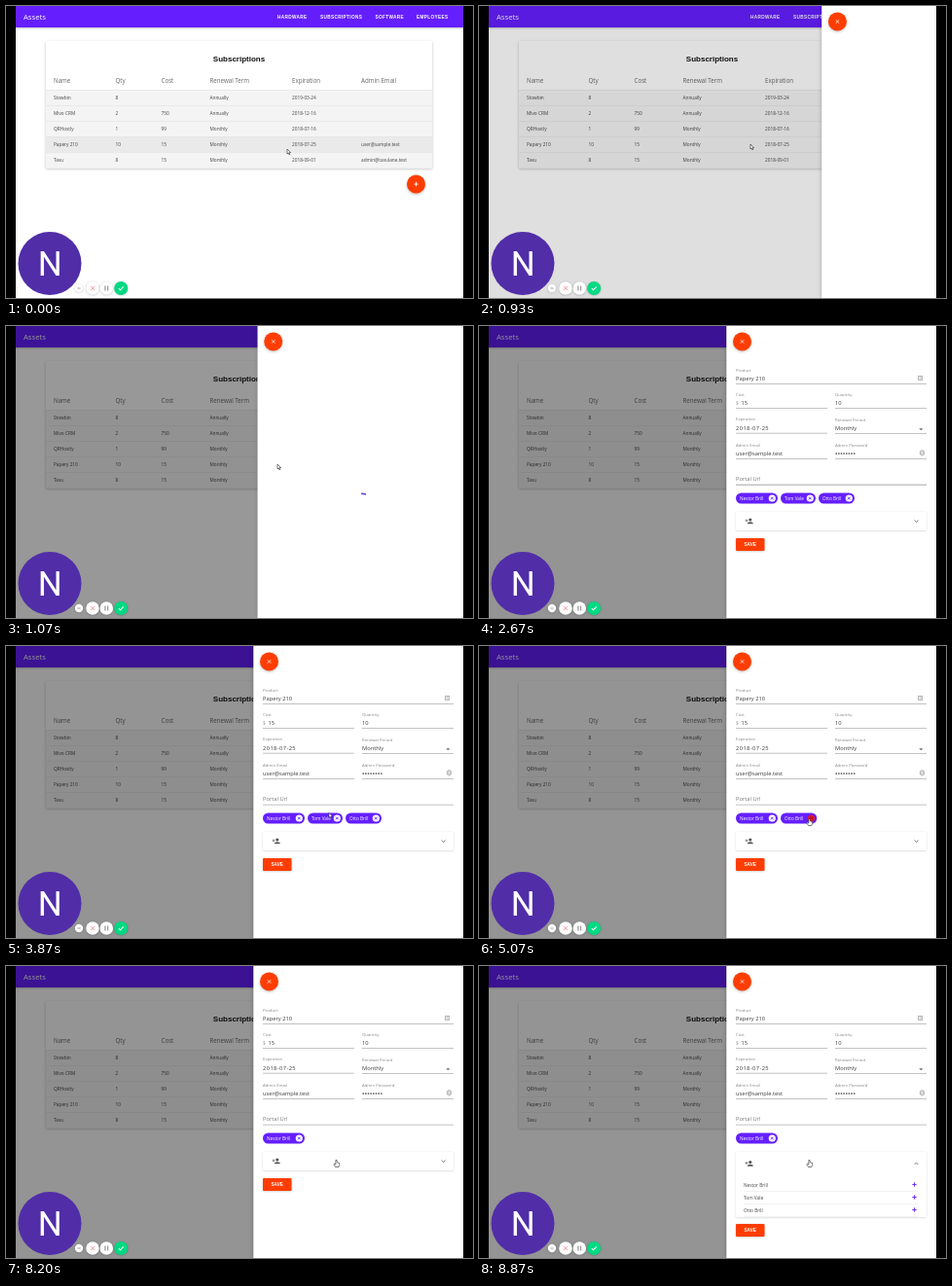
Animation of 480x300 px, one loop 9.19 s. Source, as an HTML page with a canvas:

```html
<!DOCTYPE html>
<html lang="en">
<head>
<meta charset="utf-8">
<title>Assets</title>
<style>
html, body { margin: 0; width: 100%; height: 100%; overflow: hidden; background: #000; }
canvas { display: block; width: 480px; height: 300px; }
</style>
</head>
<body>
<canvas id="stage"></canvas>
<script>
const canvas = document.getElementById('stage');
const ratio = window.devicePixelRatio || 1;
canvas.width = 480 * ratio;
canvas.height = 300 * ratio;
const c = canvas.getContext('2d');

const LOOP = 9190, OPEN = 882, LOADED = 1730, EXPAND = 8640;
const FIRST_REMOVED = 4670, SECOND_REMOVED = 7530;
const PAGE_WIDTH = 460;
const PURPLE = '#651fff', ORANGE = '#ff3d00';
const SANS = '"Open Sans", sans-serif', ARIAL = '"Liberation Sans", sans-serif';

const columns = [49, 112.5, 159.5, 209.5, 294, 365];
const headings = ['Name', 'Qty', 'Cost', 'Renewal Term', 'Expiration', 'Admin Email'];
const rows = [
  ['Stowbin', '8', '', 'Annually', '2019-03-24', ''],
  ['Mivo CRM', '2', '750', 'Annually', '2018-12-16', ''],
  ['QRHostly', '1', '99', 'Monthly', '2018-07-16', ''],
  ['Papery 210', '10', '15', 'Monthly', '2018-07-25', 'user@sample.test'],
  ['Tavu', '8', '15', 'Monthly', '2018-09-01', 'admin@tavulane.test']
];
const people = ['Nestor Brill', 'Tom Vale', 'Otto Brill'];

// time, x, y of the pointer tip
const pointerPath = [
  [0, 289, 147], [870, 289, 147], [930, 279, 142], [LOADED, 279, 142],
  [2670, 318, 153], [3300, 318, 160], [4250, 339.5, 177.5], [6470, 339.5, 177.5],
  [6730, 335.8, 177], [7270, 335.8, 177], [7430, 340, 177.5], [7600, 340, 177.5],
  [7870, 339.5, 199.5], [LOOP, 339.5, 199.5]
];

const clamp = v => Math.max(0, Math.min(1, v));
const mix = (a, b, p) => a + (b - a) * p;
const smooth = p => p * p * (3 - 2 * p);

// cubic-bezier(.25, .8, .25, 1)
function swift(x) {
  let lo = 0, hi = 1, s = .5;
  for (let i = 0; i < 20; i++) {
    s = (lo + hi) / 2;
    if (.75 * s * (1 - s) + s ** 3 < x) lo = s; else hi = s;
  }
  return 2.4 * s * (1 - s) ** 2 + 3 * s * s * (1 - s) + s ** 3;
}

function text(str, x, y, size, color, { font = SANS, weight = 400, align = 'left', spacing = 0 } = {}) {
  c.font = `${weight} ${size}px ${font}`;
  c.textAlign = align;
  c.letterSpacing = spacing + 'px';
  c.fillStyle = color;
  c.fillText(str, x, y);
}

function rect(x, y, w, h, color) {
  c.fillStyle = color;
  c.fillRect(x, y, w, h);
}

function shadowed(blur, dy, draw, alpha = .25) {
  c.save();
  c.shadowColor = `rgba(0,0,0,${alpha})`;
  c.shadowBlur = blur * ratio;
  c.shadowOffsetY = dy * ratio;
  draw();
  c.restore();
}

function rounded(x, y, w, h, r, color) {
  c.fillStyle = color;
  c.beginPath();
  c.roundRect(x, y, w, h, r);
  c.fill();
}

function circle(x, y, r, color) {
  c.fillStyle = color;
  c.beginPath();
  c.arc(x, y, r, 0, 7);
  c.fill();
}

function line(color, width, ...points) {
  c.strokeStyle = color;
  c.lineWidth = width;
  c.beginPath();
  points.forEach(([x, y]) => c.lineTo(x, y));
  c.stroke();
}

function cross(x, y, r, color, width) {
  line(color, width, [x - r, y - r], [x + r, y + r]);
  line(color, width, [x - r, y + r], [x + r, y - r]);
}

function plus(x, y, r, color, width) {
  line(color, width, [x - r, y], [x + r, y]);
  line(color, width, [x, y - r], [x, y + r]);
}

function drawPage(t) {
  rect(10, 0, PAGE_WIDTH, 300, '#fff');
  shadowed(2, .5, () => rect(10, 0, PAGE_WIDTH, 22, PURPLE));
  text('Assets', 18, 14, 7.7, '#fff', { weight: 500 });
  [['HARDWARE', 279], ['SUBSCRIPTIONS', 323], ['SOFTWARE', 379.5], ['EMPLOYEES', 422]].forEach(([s, x]) =>
    text(s, x, 12.6, 4.7, '#fff', { font: ARIAL, weight: 700, spacing: .36 }));

  shadowed(3, 1, () => rounded(41, 36, 397, 130.5, 1, '#fff'));
  text('Subscriptions', 239.5, 56.5, 8, '#111', { font: ARIAL, weight: 700, align: 'center' });
  headings.forEach((s, i) => text(s, columns[i], 79, 6.2, '#666'));
  rows.forEach((row, r) => {
    const y = 86 + r * 16.1;
    rect(41, y, 397, 16.1, r === 3 && t < 870 ? '#eaeaea' : '#f4f4f4');
    rect(41, y, 397, .5, '#dcdcdc');
    row.forEach((s, i) => text(s, columns[i], y + 9.7, 4.75, '#444'));
  });

  shadowed(3, 1.2, () => circle(421.5, 183, 9.5, ORANGE));
  plus(421.5, 183, 2.3, '#fff', .9);
}

function field(label, value, x, y, w, spacing = 0) {
  text(label, x, y - 13, 4.3, '#888');
  text(value, x, y - 3.6, 5.75, '#3a3a3a', { spacing });
  rect(x, y - .4, w, .6, '#999');
}

function chip(name, x, w, hot) {
  rounded(x, 171.5, w, 11, 5.5, PURPLE);
  text(name, x + 4, 178.8, 4.7, '#fff', { weight: 500 });
  const cx = x + w - 5.7;
  circle(cx, 177, 3.6, hot ? '#e0182d' : '#fff');
  cross(cx, 177, 1.4, hot ? '#a00c20' : PURPLE, .9);
}

function drawPeoplePanel(t) {
  const p = smooth(clamp((t - EXPAND) / 220));
  const height = mix(19, 67, p), iconY = mix(200.5, 203, p);
  shadowed(2, .5, () => rounded(264, 191, 196, height, 1, '#fff'), .18);

  circle(278.8, iconY - 1.5, 1.6, '#555');
  c.beginPath();
  c.ellipse(278.8, iconY + 2.7, 3, 2, 0, Math.PI, 0);
  c.fill();
  plus(275, iconY - .6, 1.4, '#555', .7);
  const tip = mix(1.1, -1.1, p);
  line('#666', .8, [447.6, iconY - tip], [449.5, iconY + tip], [451.4, iconY - tip]);

  if (p > 0) {
    c.save();
    c.beginPath();
    c.rect(264, 191, 196, height);
    c.clip();
    people.forEach((name, i) => {
      const y = 224.5 + i * 13;
      text(name, 272, y + 2, 4.75, '#444');
      plus(447.5, y, 2.2, PURPLE, .9);
      rect(272, y + 6.5, 180, .4, '#ddd');
    });
    c.restore();
  }

  const saveY = mix(218, 265, p);
  shadowed(2, .5, () => rounded(264, saveY, 29.5, 13, 1, ORANGE));
  text('SAVE', 278.7, saveY + 8.2, 4.7, '#fff', { font: ARIAL, weight: 700, align: 'center' });
}

function drawForm(t) {
  field('Product', 'Papery 210', 264, 59.7, 196);
  c.strokeStyle = '#888';
  c.lineWidth = .6;
  c.strokeRect(451.7, 51.2, 3.7, 4.6);
  [52.7, 54.2].forEach(y => line('#888', .6, [452.5, y], [454.6, y]));

  field('Cost', '', 264, 84.7, 94);
  text('$', 264, 81, 4.8, '#888');
  text('15', 269.5, 81.1, 5.75, '#3a3a3a');
  field('Quantity', '10', 366, 84.7, 94);
  field('Expiration', '2018-07-25', 264, 110.2, 94, .4);
  field('Renewal Period', 'Monthly', 366, 110.7, 94);
  c.fillStyle = '#666';
  c.beginPath();
  c.moveTo(452.3, 105.3);
  c.lineTo(456.3, 105.3);
  c.lineTo(454.3, 107.3);
  c.fill();
  field('Admin Email', 'user@sample.test', 264, 136.5, 94);
  field('Admin Password', '', 366, 136.5, 94);
  for (let i = 0; i < 8; i++) circle(367.2 + i * 2.65, 131, .85, '#444');
  c.strokeStyle = '#888';
  c.lineWidth = .6;
  [1.1, 2.3].forEach(r => {
    c.beginPath();
    c.ellipse(455.5, 130.3, r, r + .4, 0, 0, 7);
    c.stroke();
  });

  text('Portal Url', 264, 159, 5.75, '#777');
  rect(264, 162.8, 196, .6, t < 3350 ? '#666' : '#999');

  chip(people[0], 264, 43, false);
  if (t < FIRST_REMOVED) {
    chip(people[1], 310, 36, t > 4200);
    chip(people[2], 349, 37, false);
  } else if (t < SECOND_REMOVED) {
    chip(people[2], 310, 37.3, t < 6500 || t > 7380);
  }
  drawPeoplePanel(t);
}

function drawSpinner(t) {
  const age = t - 1050;
  if (age < 0) return;
  const start = -1.68 + age / 1000 * Math.PI;
  const sweep = .34 + 4.2 * Math.sin(clamp(age / 1350) * Math.PI) ** 2;
  c.strokeStyle = '#4a3fd0';
  c.lineWidth = 1.5;
  c.beginPath();
  c.arc(361.5, 186.3, 14, start, start + sweep);
  c.stroke();
}

function drawDrawer(t) {
  const p = swift(clamp((t - OPEN) / 280));
  if (p < .001) return;
  rect(10, 0, PAGE_WIDTH, 300, `rgba(0,0,0,${.42 * p * p})`);
  c.save();
  c.translate(215 * (1 - p), 0);
  shadowed(4, 0, () => rect(254.3, 0, 216, 300, '#fff'));
  shadowed(3, 1, () => circle(270.5, 16, 9.5, ORANGE));
  cross(270.5, 16, 1.7, '#fff', .8);
  if (t < LOADED) drawSpinner(t); else drawForm(t);
  c.restore();
}

function drawRecorder() {
  circle(45, 264.5, 32.5, '#512da8');
  text('N', 45.3, 277.3, 35, '#fff', { font: 'Roboto, sans-serif', align: 'center' });
  [[75, 4.2, '#fff'], [89, 6.8, '#fff'], [103.3, 6.8, '#fff'], [118.2, 7, '#00d983']].forEach(([x, r, color]) =>
    shadowed(2, .4, () => circle(x, 290, r, color)));
  line('#777', .7, [73.4, 290], [76.6, 290]);
  cross(89, 290, 2.2, '#f0939b', .8);
  [101.9, 104.7].forEach(x => line('#777', .9, [x, 287.5], [x, 292.5]));
  line('#fff', 1.1, [115.8, 290.2], [117.5, 291.8], [120.7, 288.3]);
}

function drawPointer(t) {
  if (t > LOADED && t < 3300) return;
  const i = pointerPath.findIndex(k => k[0] > t);
  const [t0, x0, y0] = pointerPath[i - 1], [t1, x1, y1] = pointerPath[i];
  const p = smooth((t - t0) / (t1 - t0));
  const hand = t > 4200 && t < 6500 || t > 7380;
  const shape = hand
    ? [[-.6, 0], [.6, 0], [.7, 2.3], [3.2, 3], [3.2, 5], [2.3, 7], [-1, 7], [-2.7, 4.2], [-2, 3.6], [-.7, 4.6]]
    : [[0, 0], [0, 5], [1.2, 4], [2, 5.8], [2.8, 5.4], [2, 3.7], [3.5, 3.6]];
  c.save();
  c.translate(mix(x0, x1, p), mix(y0, y1, p));
  c.beginPath();
  shape.forEach(([x, y]) => c.lineTo(x, y));
  c.closePath();
  c.fillStyle = '#fff';
  c.fill();
  c.strokeStyle = '#222';
  c.lineWidth = .6;
  c.stroke();
  c.restore();
}

function frame() {
  const t = performance.now() % LOOP;
  c.setTransform(ratio, 0, 0, ratio, 0, 0);
  rect(0, 0, 480, 300, '#000');
  c.save();
  c.beginPath();
  c.rect(10, 0, PAGE_WIDTH, 300);
  c.clip();
  drawPage(t);
  drawDrawer(t);
  drawRecorder();
  drawPointer(t);
  c.restore();
  requestAnimationFrame(frame);
}
frame();
</script>
</body>
</html>
```
